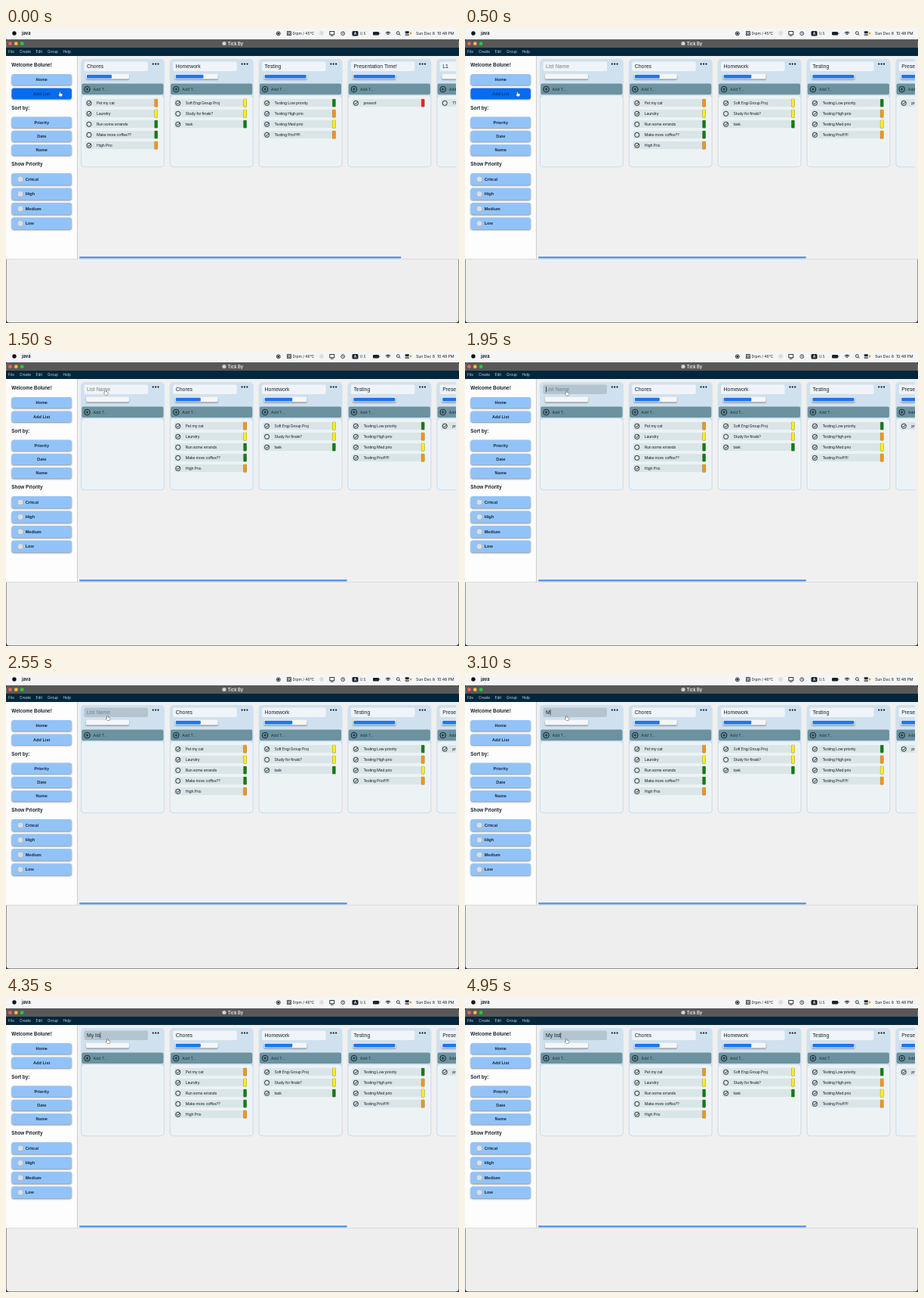
Recreate the animation shown at these times as an HTML page with a canvas. Size 600 px wide and 390 px high, loop 5 s.

```html
<!DOCTYPE html>
<html lang="en">
<head>
<meta charset="utf-8">
<style>
html, body { margin: 0; width: 100%; height: 100%; overflow: hidden; background: #ececec; }
canvas { display: block; }
</style>
</head>
<body>
<canvas id="stage" width="600" height="390"></canvas>
<script>
const ctx = document.getElementById('stage').getContext('2d');
const LOOP = 5000, ADD_AT = 250, FOCUS_AT = 1750, PITCH = 117.8;
const UI = 'Inter, sans-serif', ARIAL = '"Liberation Sans", Arial, sans-serif';
const INK = '#17232c', ORANGE = '#f7931a', YELLOW = '#fcf011', GREEN = '#0b7d18', RED = '#fb1d16';

// Tasks: [text, done, priority colour]
const LISTS = [
  { name: 'Chores', progress: .6, tasks: [['Pet my cat', 1, ORANGE], ['Laundry', 1, YELLOW],
    ['Run some errands', 0, GREEN], ['Make more coffee??', 0, GREEN], ['High Prio', 1, ORANGE]] },
  { name: 'Homework', progress: .667, tasks: [['Soft Engi Group Proj', 1, YELLOW],
    ['Study for finals?', 0, YELLOW], ['task', 1, GREEN]] },
  { name: 'Testing', progress: 1, tasks: [['Testing Low priority', 1, GREEN], ['Testing High prio', 1, ORANGE],
    ['Testing Med prio', 1, YELLOW], ['Testing Prio!!!!!!', 1, ORANGE]] },
  { name: 'Presentation Time!', progress: 1, tasks: [['present', 1, RED]] },
  { name: 'L1', progress: 0, tasks: [['T1', 0, GREEN]] }
];
const NEW_LIST = { name: '', progress: 0, tasks: [], isNew: true };

const KEYS = [[2900, 'M'], [3150, 'My'], [3500, 'My '], [3950, 'My l'],
  [4150, 'My li'], [4350, 'My lis'], [4550, 'My list']];
const PATH = [[0, 72, 87], [200, 70, 87], [600, 70, 87], [900, 99, 65], [1200, 102, 63],
  [1550, 134, 54], [1950, 135, 55.5], [2300, 135, 58], [LOOP, 135, 58]];

function box(x, y, w, h, r, fill) {
  ctx.fillStyle = fill;
  ctx.beginPath();
  ctx.roundRect(x, y, w, h, r);
  ctx.fill();
}

function shadowed(draw, blur = 2) {
  ctx.save();
  ctx.shadowColor = 'rgba(0,0,0,.45)';
  ctx.shadowBlur = blur;
  ctx.shadowOffsetY = 1;
  draw();
  ctx.restore();
}

function dot(x, y, r, fill) {
  ctx.fillStyle = fill;
  ctx.beginPath();
  ctx.arc(x, y, r, 0, 7);
  ctx.fill();
}

function ring(x, y, r, color = INK, width = .9) {
  ctx.strokeStyle = color;
  ctx.lineWidth = width;
  ctx.beginPath();
  ctx.arc(x, y, r, 0, 7);
  ctx.stroke();
}

function line(points, color = INK, width = .9) {
  ctx.strokeStyle = color;
  ctx.lineWidth = width;
  ctx.beginPath();
  points.forEach(p => ctx.lineTo(...p));
  ctx.stroke();
}

function text(s, x, y, size, { color = INK, font = UI, weight = 400, align = 'left', spacing = 0 } = {}) {
  ctx.font = `${weight} ${size}px ${font}`;
  ctx.letterSpacing = spacing + 'px';
  ctx.textAlign = align;
  ctx.textBaseline = 'alphabetic';
  ctx.fillStyle = color;
  ctx.fillText(s, x, y);
  return ctx.measureText(s).width;
}

function systemBar(t) {
  box(0, 0, 600, 16, 0, '#f5f5f5');
  dot(11, 7, 2.7, '#111');
  text('java', 21, 9.2, 5.8, { weight: 700 });
  ring(360.8, 7.3, 2.5);
  dot(360.8, 7.3, 1.4, INK);
  ctx.strokeStyle = INK;
  ctx.lineWidth = .8;
  ctx.strokeRect(372.5, 4.6, 5, 5);
  ring(375, 7.1, 1.4, INK, .8);
  text(`0rpm / ${t < 850 ? 45 : 46}°C`, 379.5, 9.2, 5, { spacing: -.05 });
  ring(418, 7, 2.4, '#cfcfcf');
  dot(418, 7, 1.2, '#cfcfcf');
  ctx.strokeStyle = INK;
  ctx.strokeRect(428.8, 4.6, 6, 4.2);
  line([[430, 10.2], [433.5, 10.2]]);
  ring(446.2, 7.2, 2.4, INK, .8);
  line([[446.2, 5.6], [446.2, 7.3], [447.4, 7.9]], INK, .7);
  box(458.5, 4, 8, 6.6, 1.5, INK);
  text('A', 462.5, 9.1, 5, { color: '#fff', weight: 600, align: 'center' });
  text('U.S.', 469, 9.2, 4.4);
  box(486, 4.9, 8, 4.6, 1.2, INK);
  box(494.5, 6.2, .8, 2, .4, INK);
  for (const r of [1.6, 3.2, 4.6]) {
    ctx.strokeStyle = INK;
    ctx.lineWidth = 1;
    ctx.beginPath();
    ctx.arc(506, 9.7, r, -2.35, -.79);
    ctx.stroke();
  }
  ring(519.3, 6.6, 1.9);
  line([[520.7, 8], [522.3, 9.7]]);
  box(528.5, 4.3, 5.5, 2.6, 1.3, INK);
  box(528.5, 7.6, 5.5, 2.6, 1.3, '#777');
  dot(536, 7, 1.4, '#f59a23');
  text('Sun Dec 8', 543, 9.2, 5.3, { spacing: -.1 });
  text('10:48 PM', 593.5, 9.2, 5.3, { spacing: -.1, align: 'right' });
}

function windowFrame() {
  box(0, 15, 600, 375, 0, '#30343a');
  box(.5, 15, 599, 374.4, 4, '#eeeeee');
  box(.5, 15, 599, 12, [4, 4, 0, 0], '#585858');
  ['#ff5f57', '#febc2e', '#28c840'].forEach((c, i) => dot(5.5 + i * 7.8, 20.7, 2.4, c));
  dot(289, 20.5, 2.6, '#d0d0d0');
  text('Tick By', 293.5, 22.8, 5.8, { color: '#eee', weight: 600 });
  box(0, 26, 600, 11, 0, '#02273c');
  [['File', 3], ['Create', 18], ['Edit', 39.5], ['Group', 55], ['Help', 75.5]]
    .forEach(([s, x]) => text(s, x, 33.4, 4.8, { color: '#c9d6dd' }));
  box(0, 37, 600, 268.5, 0, '#f0f0f0');
}

function button(label, y, h, { hover, radio } = {}) {
  shadowed(() => box(7.5, y, 79.5, h, 3, hover ? '#086cf0' : '#92c3f8'));
  const color = hover ? '#0b3c78' : '#17293b';
  text(label, radio ? 25.7 : 47.2, y + h / 2 + 2, 5.6,
    { color, font: ARIAL, weight: 700, align: radio ? 'left' : 'center' });
  if (!radio) return;
  dot(19, y + h / 2 + .2, 3.9, '#a3adb7');
  dot(19, y + h / 2, 3.4, '#dedede');
}

function sidebar(hover) {
  box(0, 37, 94.5, 268.5, 0, '#fdfdfd');
  box(94, 37, .8, 268.5, 0, '#c3c3c3');
  box(0, 305, 600, .7, 0, '#d4d4d4');
  [['Welcome Bolune!', 51.2], ['Sort by:', 107.7], ['Show Priority', 182.3]]
    .forEach(([s, y]) => text(s, 7.3, y, 6.4, { font: ARIAL, weight: 700 }));
  button('Home', 61, 14.5);
  button('Add List', 79.4, 14.5, { hover });
  ['Priority', 'Date', 'Name'].forEach((s, i) => button(s, 117.6 + i * 18.2, 14.5));
  ['Critcal', 'High', 'Medium', 'Low'].forEach((s, i) => button(s, 192 + i * 19.5, 15.8, { radio: true }));
}

function nameField(list, x, t) {
  const focused = list.isNew && t >= FOCUS_AT;
  box(x + 4.5, 44.5, 84.5, 12.6, 2, focused ? '#b5c5cf' : '#f0f4f8');
  const style = { font: ARIAL };
  if (!list.isNew) return text(list.name, x + 8, 53.2, 6.9, style);
  const key = KEYS.filter(k => k[0] <= t).pop();
  const typed = key ? key[1] : '';
  const width = text(typed, x + 8, 53.2, 6.9, style);
  if (!typed) text('List Name', x + 8, 53.2, 6.9, { font: ARIAL, color: focused ? '#71808a' : '#777d82' });
  const blinkOn = (t - (key ? key[0] : FOCUS_AT)) % 1000 < 500;
  if (focused && blinkOn) box(x + 8 + width, 47.2, .7, 7.4, 0, '#222');
}

function taskRow([label, done, color], x, y) {
  box(x + 6, y - 5, 96, 10, 2, '#dae5e7');
  ring(x + 11, y + .3, 3.1);
  if (done) line([[x + 9.5, y + .2], [x + 10.7, y + 1.5], [x + 13.4, y - 1.6]]);
  text(label, x + 21, y + 2, 5.2, { spacing: -.22 });
  box(x + 97.5, y - 5.2, 4.6, 10.6, 1, '#8a8a5a');
  box(x + 97.9, y - 4.9, 3.8, 10, .8, color);
}

function card(list, x, t) {
  box(x, 41, 111, 143.3, 5, '#cfe1ef');
  nameField(list, x, t);
  [95.8, 99.2, 102.6].forEach(dx => dot(x + dx, 47.6, 1.1, '#111'));
  shadowed(() => box(x + 7, 60.6, 57, 7, 1.5, '#f5f6f7'), 1.5);
  box(x + 8, 61.8, 55 * list.progress, 4.6, 1, '#1c76ee');
  box(x + 1.3, 73.6, 108.2, 14.4, 2, '#6c929f');
  ring(x + 8.5, 81, 3.8, '#12222a', 1);
  line([[x + 6.5, 81], [x + 10.5, 81]]);
  line([[x + 8.5, 79], [x + 8.5, 83]]);
  text('Add T…', x + 16.5, 83, 5.1, { color: '#1c343e' });
  box(x + 1.5, 90, 108, 92.8, 4, '#f8fafc');
  box(x + 2.3, 90.8, 106.4, 91.2, 3.5, '#edf2f5');
  list.tasks.forEach((task, i) => taskRow(task, x, 99 + i * 14));
}

function board(t) {
  const added = t >= ADD_AT;
  const lists = added ? [NEW_LIST, ...LISTS] : LISTS;
  ctx.save();
  ctx.beginPath();
  ctx.rect(95, 37, 501, 268);
  ctx.clip();
  lists.slice(0, 5).forEach((list, i) => card(list, 99 + i * PITCH, t));
  ctx.restore();
  box(97, 302.2, added ? 355 : 426.5, 2.2, 1.1, '#4a90ec');
}

function pointerAt(t) {
  const i = PATH.findIndex(p => p[0] > t);
  const [t0, x0, y0] = PATH[i - 1], [t1, x1, y1] = PATH[i];
  const k = (t - t0) / (t1 - t0), e = k * k * (3 - 2 * k);
  return [x0 + (x1 - x0) * e, y0 + (y1 - y0) * e];
}

function pointer(x, y, hand) {
  const shape = new Path2D(hand
    ? 'M-1.3 .8V-2.4Q-.8 -3.4 -.2 -2.4V-.5Q.4 -1.1 .9 -.4Q1.6 -.8 1.9 0Q2.6 -.2 2.7 .6V1.8L1.9 3.4H-1L-2.6 1.1Q-2.6 .2 -1.3 .8Z'
    : 'M0 -2V4L1.3 2.8L2.2 4.7L3.1 4.2L2.3 2.4H4Z');
  ctx.save();
  ctx.translate(x, y);
  ctx.lineWidth = .8;
  ctx.lineJoin = 'round';
  ctx.fillStyle = hand ? '#fff' : '#111';
  ctx.strokeStyle = hand ? '#111' : '#fff';
  ctx.stroke(shape);
  ctx.fill(shape);
  ctx.restore();
}

function frame(now) {
  const t = now % LOOP;
  const [x, y] = pointerAt(t);
  const onButton = x < 87 && y > 79.4;
  const onField = x > 103.5 && y < 60;
  systemBar(t);
  windowFrame();
  sidebar(onButton);
  board(t);
  pointer(x, y, onButton || onField);
  requestAnimationFrame(frame);
}
requestAnimationFrame(frame);
</script>
</body>
</html>
```
